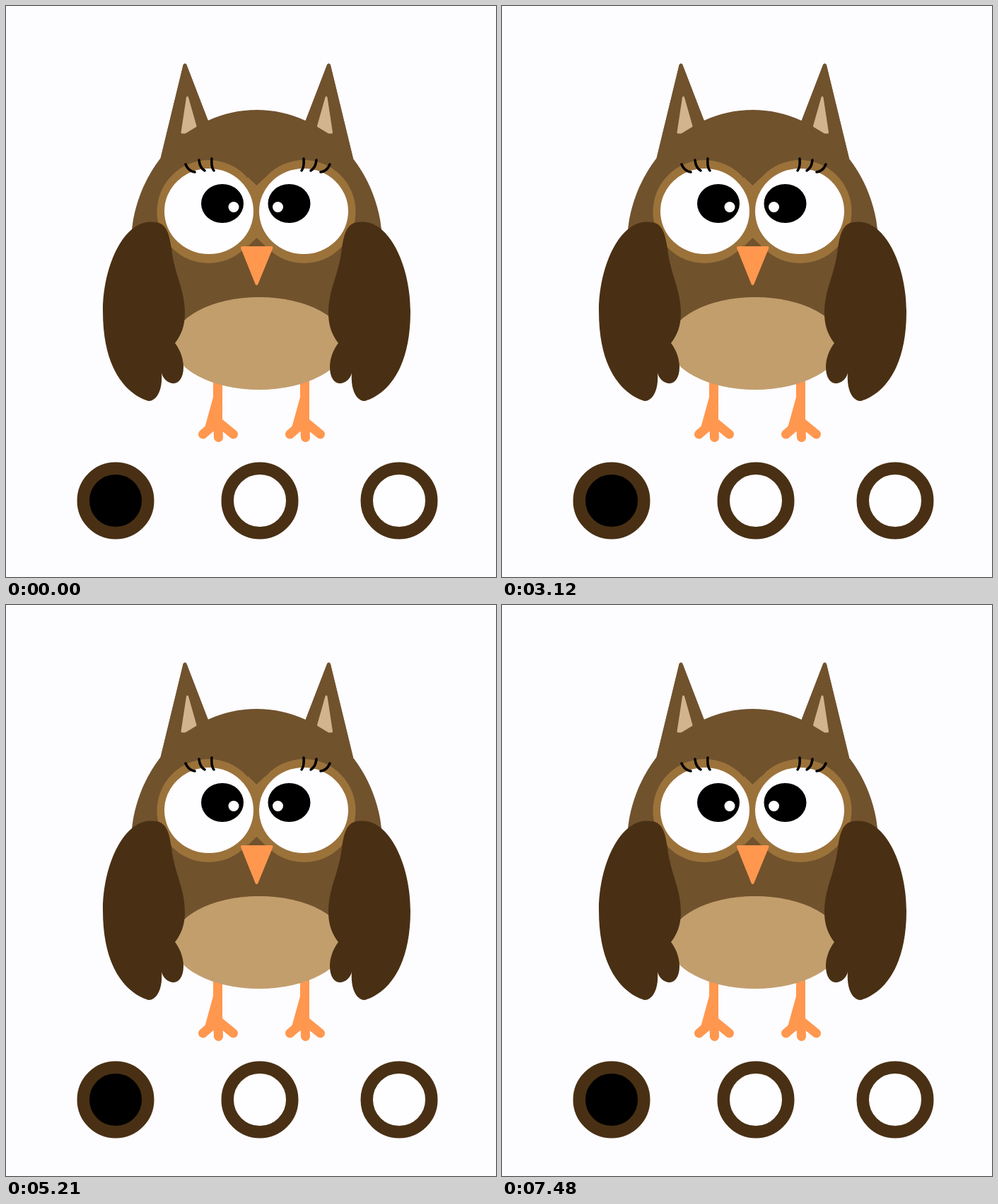
Recreate the animation shown at these times as an HTML page. Size 693 by 808 pixels, loop 7.51 s.

```html
<!DOCTYPE html>
<html lang="en">
<head>
<meta charset="utf-8">
<title>Owl loader</title>
<style>
  html, body { margin: 0; width: 100%; height: 100%; overflow: hidden; background: #fdfcff; }
  svg { display: block; width: 693px; height: 808px; }
  .dark { fill: #493014; }
  .body { fill: #70522d; stroke: #70522d; stroke-linejoin: round; }
  .rim { fill: #9b723a; }
  .white { fill: #fefdff; }
  .orange { fill: #ff974f; stroke: #ff974f; stroke-linejoin: round; stroke-linecap: round; }
  .inner-ear { fill: #d2b48f; stroke: #d2b48f; stroke-width: 3; stroke-linejoin: round; }
  .lash { fill: none; stroke: #000; stroke-width: 3.5; stroke-linecap: round; }
  .ring { stroke: #493014; stroke-width: 17.5; }
</style>
</head>
<body>
<svg viewBox="0 0 693 808">
  <defs>
    <g id="ear">
      <path class="body" stroke-width="5" d="M253 84L221 216L290 180L283 162Z"/>
      <path class="inner-ear" d="M256.5 129.5L268 170Q258 176 253 179L249 179Z"/>
    </g>
    <path id="leg" class="orange" fill="none" stroke-width="13"
      d="M299.5 530V588L278.5 606M299.5 588L300.5 610.5M299.5 588L321.5 606"/>
    <path id="lashes" class="lash" d="M254 224Q258 234 267 235M273 218Q274 229 281 233M291 216Q290 228 294 233"/>
    <path id="wing" class="dark" d="M203 305.5C225 304 230 316 234 343C238 380 253 400 253 435C253 455 246 468 239 477
      C245 485 251 497 251 511C251 528 243 535 235 534C226 532 221 525 220 519C222 545 212 559 202 559
      C194 557 137 540 137 432C137 370 165 307 203 305.5Z"/>
  </defs>

  <use href="#leg"/>
  <use href="#leg" x="123"/>
  <use href="#ear"/>
  <use href="#ear" transform="matrix(-1 0 0 1 709.5 0)"/>
  <ellipse class="body" stroke="none" style="stroke:none" cx="354.5" cy="340" rx="178" ry="193"/>
  <use href="#ear"/>
  <use href="#ear" transform="matrix(-1 0 0 1 709.5 0)"/>
  <ellipse fill="#c29e6d" cx="358" cy="477.5" rx="122" ry="65.5"/>

  <g class="rim">
    <circle cx="286.5" cy="291" r="73"/>
    <circle cx="421.5" cy="291" r="73"/>
    <path d="M342 242L354.5 254L367 242V340L354.5 328L342 340Z"/>
  </g>
  <g class="white">
    <ellipse cx="287" cy="290.5" rx="63" ry="60.5"/>
    <ellipse cx="421" cy="290.5" rx="63" ry="60.5"/>
  </g>
  <ellipse cx="306" cy="279.5" rx="30" ry="27.5"/>
  <ellipse cx="400.5" cy="279.5" rx="30" ry="27.5"/>
  <circle class="white" cx="322" cy="284.5" r="7.5"/>
  <circle class="white" cx="384.5" cy="284.5" r="7.5"/>
  <use href="#lashes"/>
  <use href="#lashes" transform="matrix(-1 0 0 1 712 0)"/>
  <path class="orange" stroke-width="4" d="M334 342H375.5L354.5 393Z"/>

  <use href="#wing"/>
  <use href="#wing" transform="matrix(-1 0 0 1 709 0)"/>

  <circle class="ring" cx="155" cy="700" r="45.75"/>
  <circle class="ring" cx="359" cy="700" r="45.75"/>
  <circle class="ring" cx="556" cy="700" r="45.75"/>
</svg>
<script>
  const LOOP = 7510, STEP = 800, LEAD = 60;
  const PAUSE_START = 3120, PAUSE_END = 3450;
  const rings = document.querySelectorAll('.ring');
  const start = performance.now();

  function draw(now) {
    let t = Math.max(0, now - start) % LOOP;
    if (t > PAUSE_START && t < PAUSE_END) t = PAUSE_START;
    const active = Math.floor((t + LEAD) / STEP) % rings.length;
    rings.forEach((ring, i) => ring.setAttribute('fill', i === active ? '#000' : '#fefdff'));
    requestAnimationFrame(draw);
  }
  draw(start);
</script>
</body>
</html>
```
